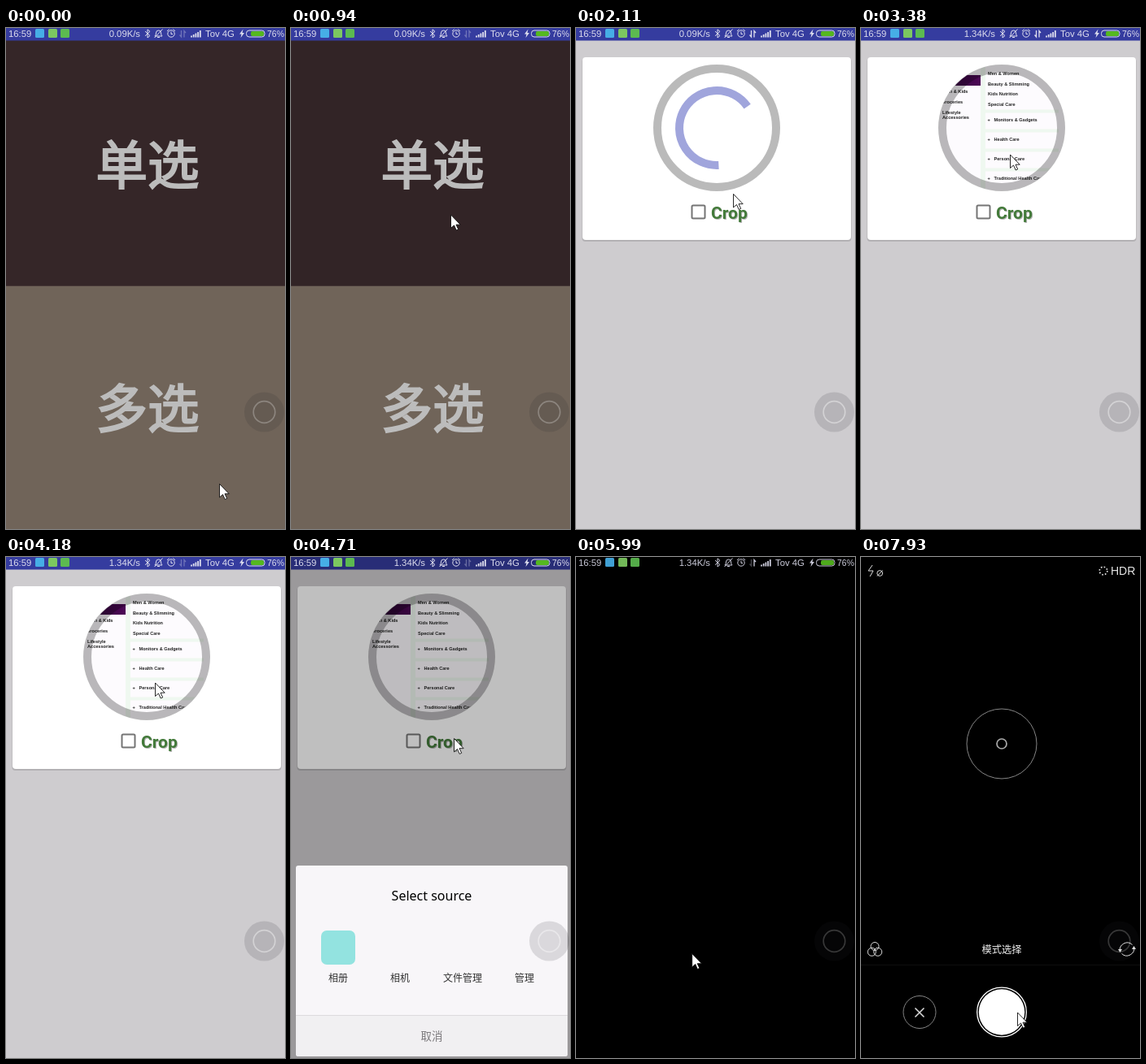
An HTML page for the animation above (8000 ms loop, 343 px wide and 617 px high).

```html
<!DOCTYPE html>
<html lang="zh-CN">
<head>
<meta charset="utf-8">
<title>Image picker</title>
<style>
html, body { margin: 0; width: 100%; height: 100%; overflow: hidden; background: #000; }
svg { display: block; width: 100vw; height: 100vh; }
text { font-family: "Noto Sans CJK SC", "Noto Sans CJK", sans-serif; }
.mid { text-anchor: middle; }
.big { font-size: 63.5px; font-weight: 400; fill: #bcbcbc; stroke: #bcbcbc; stroke-width: 2.2px; }
.crop { font: 700 21px Roboto, sans-serif; }
.tiny text { font: 700 5.6px "Liberation Sans", Arial, sans-serif; fill: #222; }
.status text { font: 11.3px "Liberation Sans", Arial, sans-serif; fill: #dedeee; }
.line { fill: none; stroke: #dedeee; }
.labels text { font-size: 12px; fill: #333; text-anchor: middle; }
</style>
</head>
<body>
<svg viewBox="0 0 343 617" preserveAspectRatio="none">
  <defs>
    <clipPath id="disc"><circle cx="173" cy="123" r="77.5"/></clipPath>
    <linearGradient id="plum"><stop stop-color="#2c0636"/><stop offset="1" stop-color="#4d0756"/></linearGradient>
  </defs>

  <g id="menu">
    <path fill="#352628" d="M0 0h343v318H0z"/>
    <path id="press" d="M0 16h343v302H0z"/>
    <path fill="#706459" d="M0 317.700h343v300H0z"/>
    <text class="big mid" x="174" y="191.500">单选</text>
    <text class="big mid" x="174" y="491.500">多选</text>
  </g>

  <g id="page">
    <path fill="#cecccf" d="M0 0h343v617H0z"/>
    <rect x="7.5" y="37" width="331" height="226" rx="4" fill="#b3b1b4"/>
    <rect x="8" y="36" width="330" height="225" rx="4" fill="#fff"/>
    <path id="spin" fill="none" stroke="#a0a5dc" stroke-width="10"/>
    <g id="photo" class="tiny" clip-path="url(#disc)">
      <path fill="#fdfbfe" d="M95 45h156v156H95z"/>
      <path fill="url(#plum)" d="M95 58h52v13H95z"/>
      <path fill="#eff8f0" d="M147 45h6v156h-6z"/>
      <g id="bands" fill="#eff8f0"></g>
      <g id="list"></g>
    </g>
    <circle cx="173" cy="123" r="73" fill="none" stroke="#000" stroke-opacity=".27" stroke-width="10"/>
    <circle id="tap" cx="173" cy="123" r="78"/>
    <rect x="142.5" y="218.5" width="16" height="16" rx="1.5" fill="none" stroke="#757575" stroke-width="2"/>
    <text class="crop" x="167" y="236" fill="#b4b4b4">Crop</text>
    <text class="crop" x="166" y="235" fill="#437a3a">Crop</text>
  </g>

  <path id="bar" fill="#353c9f" d="M0 0h343v15.500H0z"/>
  <path id="scrim" d="M0 0h343v617H0z"/>

  <g id="sheet">
    <rect x="6" y="380" width="334" height="235" rx="3" fill="#f8f6f9"/>
    <path fill="#f1f0f2" d="M6 564h334v48q0 3-3 3H9q-3 0-3-3z"/>
    <path stroke="#dddbde" d="M6 564.5h334"/>
    <text class="mid" x="173" y="422.5" style="font:16px 'Noto Sans',sans-serif">Select source</text>
    <rect x="37" y="460" width="42" height="42" rx="7" fill="#93e3e0"/>
    <g class="labels">
      <text x="58" y="522.5">相册</text>
      <text x="134" y="522.5">相机</text>
      <text x="211" y="522.5">文件管理</text>
      <text x="287" y="522.5">管理</text>
    </g>
    <text class="mid" x="173" y="595" font-size="13.5" fill="#7b797c">取消</text>
  </g>

  <path id="dark" d="M0 0h343v617H0z"/>

  <g id="status" class="status">
    <text x="3" y="11">16:59</text>
    <rect x="36" y="1" width="11" height="11" rx="1.5" fill="#46aee6"/>
    <rect x="52" y="1" width="11" height="11" rx="1.5" fill="#7cc860"/>
    <rect x="67" y="1" width="11" height="11" rx="1.5" fill="#5cba50"/>
    <text id="rate" x="165" y="11" text-anchor="end"></text>
    <g class="line">
      <path d="M171 4l6 5.500-3 2.500V1.800l3 2.500-6 5.500"/>
      <path d="M183 10h9q-1.500-1.500-1.500-4a3 3 0 0 0-6 0q0 2.500-1.500 4M186 11.500h3M192.500 1.500l-10 10.500"/>
      <circle cx="203" cy="7" r="4.200"/>
      <path d="M203 4.500v3h2M198 4l2.500-2.500M208 4l-2.500-2.500"/>
      <path id="down" stroke-width="1.300" d="M215.500 3v8l-2-2.500"/>
      <path id="up" stroke-width="1.300" d="M219 11.500v-8l2 2.500"/>
      <path stroke-width="1.800" d="M228 11.500v-2M230.700 11.500V8M233.400 11.500V6.500M236.100 11.500V5M238.800 11.500V3"/>
      <rect x="295.500" y="3" width="22.500" height="8" rx="3.500"/>
    </g>
    <rect x="301" y="4" width="16" height="6" rx="2" fill="#55b81f"/>
    <path fill="#dedeee" d="M291.500 1.500l-4.500 6h2.500l-1 4.500 4.500-6h-2.500z"/>
    <text x="245" y="11">Tov 4G</text>
    <text x="321" y="11" style="font-size:10.500px">76%</text>
  </g>

  <g id="float">
    <circle cx="317.500" cy="473" r="24.500" fill="#28242c" fill-opacity=".14"/>
    <circle id="halo" cx="317.500" cy="473" r="13.300" fill="none" stroke="#fff" stroke-width="1.700"/>
  </g>

  <g id="camera" fill="none" stroke="#ddd">
    <path stroke="#0e0e0e" d="M0 502.500h343"/>
    <path d="M14 10l-5 7h6l-4 7M20 23.500l6.500-7"/>
    <circle cx="23.200" cy="20" r="3.400"/>
    <circle cx="298" cy="17" r="4.800" stroke-width="1.700" stroke-dasharray="1.700 2.070"/>
    <text x="307" y="22" fill="#e4e4e4" stroke="none" style="font:14px 'Liberation Sans',Arial,sans-serif">HDR</text>
    <g id="focus">
      <circle cx="173" cy="230" r="43" stroke="#858585"/>
      <circle cx="173" cy="230" r="6" stroke="#aaa" stroke-width="1.700"/>
    </g>
    <circle cx="17" cy="479.500" r="5"/>
    <circle cx="13.300" cy="486.300" r="5"/>
    <circle cx="20.700" cy="486.300" r="5"/>
    <text class="mid" x="173" y="487.500" font-size="12.300" fill="#eee" stroke="none">模式选择</text>
    <path d="M318.500 486a9 9 0 0 1 15-8.500M335.500 480a9 9 0 0 1-15 8.500"/>
    <path fill="#ddd" stroke="none" d="M316 483h5l-2.500 4zM333 483h5l-2.500-4z"/>
    <circle cx="72" cy="560.500" r="20" stroke="#858585"/>
    <path stroke-width="1.500" d="M66.500 555.500l11 11M77.500 555.500l-11 11"/>
    <circle cx="173" cy="560.500" r="30.300" stroke="#fff" stroke-width="1.300"/>
    <circle cx="173" cy="560.500" r="28.200" fill="#fff" stroke="none"/>
  </g>

  <path id="cursor" fill="#fff" stroke="#111" stroke-width=".9" d="M0 0v16.500l4-3.500 2.700 6 2.500-1.100-2.700-5.700h5.200z"/>
</svg>

<script>
const LOOP = 8000;
const $ = id => document.getElementById(id);

const bursts = [
  [0, 0, 1], [130, 130, 1], [300, 430, 2], [680, 940, 3], [1340, 2110, 7], [2240, 2610, 4],
  [2760, 2890, 2], [3140, 3380, 3], [3530, 3650, 2], [3800, 4180, 4], [4560, 4560, 1],
  [4710, 5330, 6], [5480, 6120, 6], [6770, 6890, 2], [7040, 7420, 4], [7670, 7930, 3]
];
const ticks = bursts.flatMap(([a, b, n]) =>
  Array.from({ length: n }, (_, i) => n > 1 ? Math.floor(a + (b - a) * i / (n - 1)) : a));

const pointer = [
  [0, 262.5, 561.5], [130, 201, 303], [430, 196.5, 230], [1720, 196.5, 230], [2110, 193.5, 204.5],
  [2890, 193.5, 204.5], [3380, 183.5, 156], [3650, 183.5, 155], [4180, 183.5, 155], [4710, 200.5, 223.5],
  [5330, 142.700, 488.500], [6890, 142.700, 488.500], [7420, 178, 541], [7930, 192.5, 561], [LOOP, 192.5, 561]
];

const clamp = v => Math.max(0, Math.min(1, v));
const ramp = (t, a, b) => clamp((t - a) / (b - a));
const ease = p => 1 - (1 - p) ** 3;
const show = (id, on) => $(id).style.display = on ? "" : "none";
const fade = (id, v) => $(id).style.opacity = v;
const move = (id, x, y) => $(id).setAttribute("transform", `translate(${x} ${y})`);

const rows = [
  [156, 58, "Men & Women"], [156, 70.5, "Beauty & Slimming"], [156, 83, "Kids Nutrition"],
  [156, 95.5, "Special Care"], [101, 80, "Men & Kids"], [99, 93, "Groceries"],
  [100, 106, "Lifestyle"], [100, 112, "Accessories"]
];
["Monitors & Gadgets", "Health Care", "Personal Care", "Traditional Health Care"]
  .forEach((s, i) => rows.push([155.5, 115 + i * 24, "+"], [163.5, 115 + i * 24, s]));
$("list").innerHTML = rows.map(([x, y, s]) =>
  `<text x="${x}" y="${y}">${s.replace("&", "&amp;")}</text>`).join("");
$("bands").innerHTML = [0, 1, 2, 3].map(i =>
  `<path d="M153 ${100.5 + i * 24}h90v4h-90z"/>`).join("");

function polar(deg) {
  const a = deg * Math.PI / 180;
  return `${173 + 46 * Math.cos(a)} ${123 + 46 * Math.sin(a)}`;
}

function spinner(t) {
  const s = (t - 2110) / 1000;
  const span = 138 + 100 * Math.cos(s * 6.8);
  const head = 325 + 260 * s;
  $("spin").setAttribute("d", `M${polar(head - span)}A46 46 0 ${span > 180 ? 1 : 0} 1 ${polar(head)}`);
}

function placePointer(t) {
  const i = pointer.findIndex(k => k[0] > t);
  const [a, x0, y0] = pointer[i - 1], [b, x1, y1] = pointer[i];
  const p = ramp(t, a, b);
  move("cursor", x0 + (x1 - x0) * p, y0 + (y1 - y0) * p);
}

function draw(t) {
  const slide = ease(ramp(t, 1240, 1720));
  const up = ease(ramp(t, 4430, 4710)) * (1 - ramp(t, 5480, 5860));
  const black = t >= 5850, cam = t >= 6770;

  fade("press", .05 * ramp(t, 550, 940));
  move("menu", -100 * slide, 0);
  show("menu", slide < 1);
  show("page", t >= 1340);
  move("page", 343 * (1 - slide), 0);

  show("spin", t < 2760);
  spinner(t);
  show("photo", t >= 2760);
  fade("photo", ramp(t, 2630, 2890));
  fade("tap", .06 * Math.sin(Math.PI * ramp(t, 3670, 4180)));

  fade("scrim", .25 * up);
  show("sheet", up > 0);
  move("sheet", 0, 240 * (1 - up));
  show("dark", black);

  show("status", t < 6120);
  fade("status", black ? .92 : 1);
  $("rate").textContent = t < 2760 ? "0.09K/s" : "1.34K/s";
  const busy = t >= 1980 && t < 3530;
  fade("down", busy ? 1 : .35);
  fade("up", busy || t >= 5480 ? 1 : .35);

  fade("halo", black ? .2 : t < 1340 ? .26 : .4);
  show("camera", cam);
  fade("camera", ramp(t, 6640, 6890));
  show("focus", t >= 7040);
  placePointer(t);
}

let last = -1;
function frame(now) {
  const t = now % LOOP;
  const tick = ticks.filter(k => k <= t).pop();
  if (tick !== last) draw(last = tick);
  requestAnimationFrame(frame);
}
draw(0);
requestAnimationFrame(frame);
</script>
</body>
</html>
```
